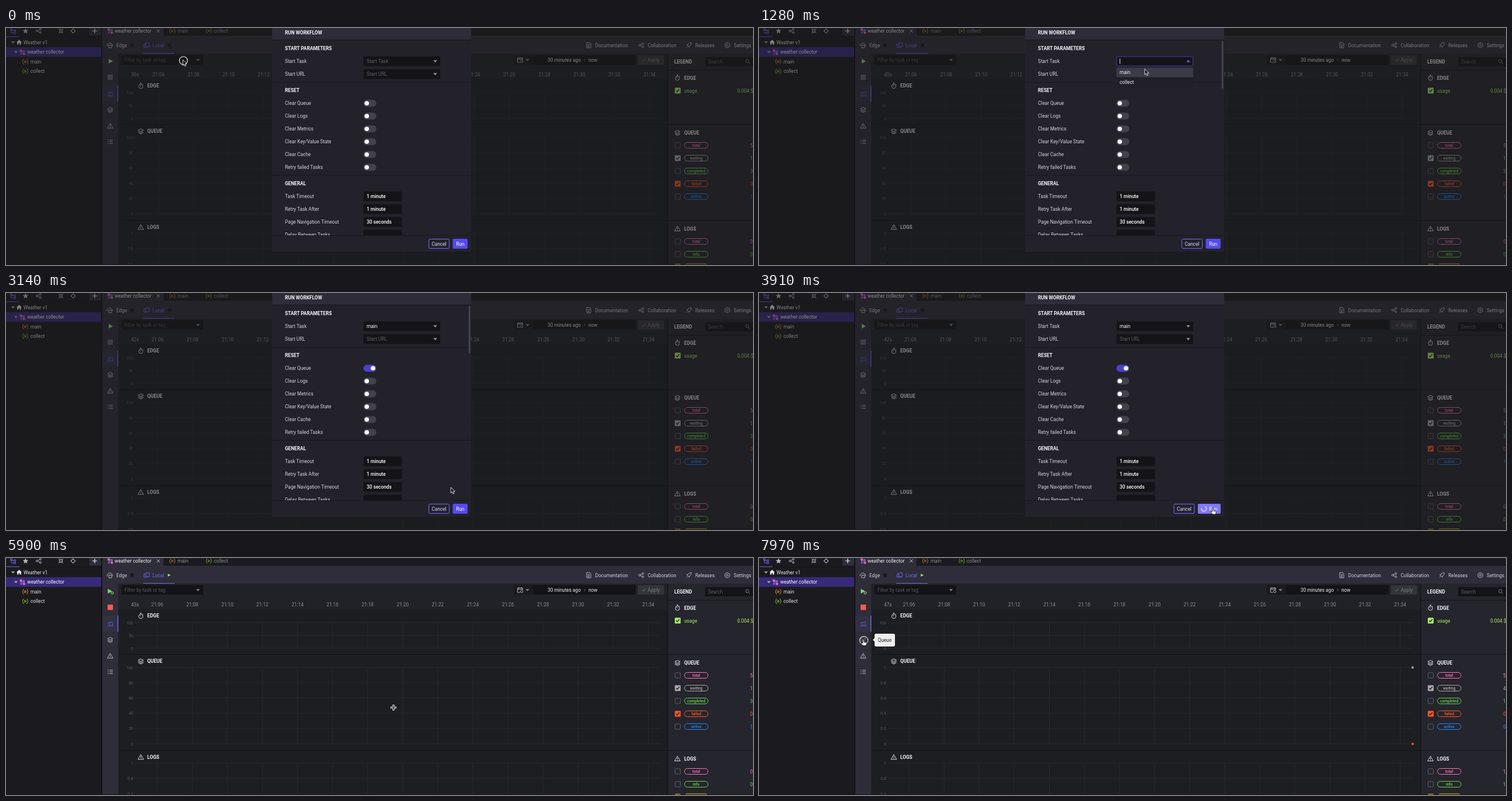
These frames come from a looping animation (1280 px wide and 407 px high, 8000 ms). An HTML page:

```html
<!DOCTYPE html>
<html lang="en">
<head>
<meta charset="utf-8">
<title>Run workflow</title>
<style>
html, body { margin: 0; width: 100%; height: 100%; overflow: hidden; background: #1d1e22; }
svg { display: block; }
#stage { width: 100vw; height: 100vh; }
text { font: 400 8.25px Roboto, "Open Sans", sans-serif; white-space: pre; }
.b { font-weight: 700; }
.m { font-weight: 500; }
.tick { font-size: 7px; }
.pill { font-size: 6.6px; font-weight: 500; }
.spin { animation: spin 1s linear infinite; }
@keyframes spin { from { transform: rotate(-40deg); } to { transform: rotate(320deg); } }
.knob { animation: knob 8s linear infinite; }
@keyframes knob { 0%, 32% { transform: none; } 34%, 100% { transform: translateX(10.6px); } }
.slot { animation: slot 8s linear infinite; }
@keyframes slot { 0%, 32% { fill: #42424d; } 34%, 100% { fill: #4b40cd; } }
.run { animation: run 8s linear infinite; }
@keyframes run { 0%, 42.3% { fill: #554bf0; } 43.5%, 49.5% { fill: #8178fb; } 51.5%, 100% { fill: #554bf0; } }
</style>
</head>
<body>
<svg id="stage" viewBox="0 0 1280 407" preserveAspectRatio="none"></svg>
<script>
const LOOP = 8000;
const css = [];
const pct = ms => (ms / LOOP * 100).toFixed(3) + '%';

// Class that is opaque only inside the given [from, to] spans
function show(name, ...spans) {
  const keys = spans.map(([a, b]) => `${pct(a)}{opacity:1}${pct(b)}{opacity:0}`).join('');
  css.push(`.${name}{animation:${name} ${LOOP}ms step-end infinite}@keyframes ${name}{0%{opacity:0}${keys}}`);
}

// Class that moves through [ms, x, y, easing] points
function track(name, points, ease = 'linear') {
  const key = ([ms, x, y, e]) =>
    `${pct(ms)}{transform:translate(${x}px,${y}px);animation-timing-function:${e || ease}}`;
  const ends = [[0, ...points[0].slice(1, 3)], ...points, [LOOP, ...points[points.length - 1].slice(1, 3)]];
  css.push(`.${name}{animation:${name} ${LOOP}ms linear infinite}@keyframes ${name}{${ends.map(key).join('')}}`);
}

show('modal', [0, 5540]);
show('after', [5540, LOOP]);
show('closed', [0, 890], [1560, LOOP]);
show('open', [890, 1560]);
show('empty', [0, 890]);
show('picked', [1560, LOOP]);
show('bar', [600, 3320], [4500, LOOP]);
show('idle', [0, 3790]);
show('busy', [3790, LOOP]);
show('p0', [0, 6100]);
show('p1', [6100, 7610]);
show('p2', [7610, LOOP]);
show('tip', [7120, LOOP]);
show('guide', [6430, 6880]);
show('ring', [0, 50], [880, 960], [1440, 1560], [2480, 2600], [3440, 3560], [7760, LOOP]);
show('arrow', [0, 2250], [2760, 3380], [3990, 5540]);
show('hand', [2250, 2760], [3380, 3990], [7060, LOOP]);
show('cross', [5540, 7060]);

const turns = [0, 400, 1900, 2900, 4100, 6100, 7610];
const drift = [0, .7, 1.3, 1.7, 2.2, 3.2, 4.2];
track('axis', turns.map((ms, i) => [ms, -drift[i], 0]), 'step-end');
track('secs', turns.map((ms, i) => [ms, 0, -20 * i]), 'step-end');
track('guidex', [[6400, 366, 0], [6550, 318, 0], [6610, 286, 0], [6880, 222, 0]]);
const glide = 'cubic-bezier(.45,0,.4,1)';
track('cursor', [
  [50, 303, 54.5, glide], [830, 662, 56], [900, 662, 56, glide], [1260, 661, 70.5],
  [1750, 661, 70.5, glide], [2380, 621, 128.5], [2600, 621, 128.5, glide],
  [3350, 777, 355], [3500, 777.5, 369.5], [3920, 777.5, 369.5, glide], [4650, 669, 258.5],
  [5840, 669, 258.5, 'cubic-bezier(.4,0,.75,.8)'], [6490, 318, 138], [6550, 292, 135],
  [6610, 281, 135.5], [6880, 215, 139], [7150, 178.5, 140]
]);
document.head.append(Object.assign(document.createElement('style'), { textContent: css.join('\n') }));

const ICONS = {
  layers: 'M-4.5-2 0-4.3 4.5-2 0 .3ZM-4.5 .3 0 2.6 4.5 .3M-4.5 2.3 0 4.6 4.5 2.3',
  warn: 'M0-4.3 4.8 4H-4.8ZM0-1.4V1.3M0 2.2V3',
  timer: 'M-1.5-4.6H1.5M0-4.6V-3M-3.6 .8a3.6 3.6 0 1 0 7.2 0a3.6 3.6 0 1 0-7.2 0M0 .8-1.4-1M3-3l1 1',
  list: 'M-4.5-3H-3M-1.5-3H4.5M-4.5 0H-3M-1.5 0H4.5M-4.5 3H-3M-1.5 3H4.5',
  chart: 'M-4.3 4.5V2M-1.4 4.5V0M1.5 4.5V1M4.3 4.5V-1.5M-4.5-.5-1.5-3 1-1.8 4.5-4.8',
  tree: 'M-4.5-4h3v2.5h-3zM1.5-2h3V.5h-3zM1.5 2.2h3v2.5h-3zM-3-1.5V3.5H1.5M-3-.7H1.5',
  share: 'M-4.4 0a1.5 1.5 0 1 0 3 0a1.5 1.5 0 1 0-3 0M1.4-2.8a1.5 1.5 0 1 0 3 0a1.5 1.5 0 1 0-3 0M1.4 2.8a1.5 1.5 0 1 0 3 0a1.5 1.5 0 1 0-3 0M-1.5-.7 1.5-2.1M-1.5 .7 1.5 2.1',
  shrink: 'M-4-4-1-1M-1-3.5V-1H-3.5M4-4 1-1M1-3.5V-1H3.5M-4 4-1 1M-3.5 1H-1V3.5M4 4 1 1M1 3.5V1H3.5',
  target: 'M-3 0a3 3 0 1 0 6 0a3 3 0 1 0-6 0M0-4.6V-2M0 2V4.6M-4.6 0H-2M2 0H4.6',
  plus: 'M-4 0H4M0-4V4',
  close: 'M-2.6-2.6 2.6 2.6M2.6-2.6-2.6 2.6',
  task: 'M-2.3-4.3-4-3V-1L-5 0-4 1V3L-2.3 4.3M2.3-4.3 4-3V-1L5 0 4 1V3L2.3 4.3M-1.2-2V2L2 0Z',
  edge: 'M-4.5 1.5A2.4 2.4 0 0 1-3-2A3.2 3.2 0 0 1 3-1.6A2 2 0 0 1 4 2M-2 0V4.4H3V0Z',
  local: 'M-4.5-2V3.5H0M-4.5-2H-1.5V-4H4.5V2.5H-1.5V-2M1.5 2.5V4.5',
  doc: 'M-3.5-4.5H1.5L3.5-2.5V4.5H-3.5ZM-1.7-1H1.7M-1.7 1H1.7M-1.7 2.8H1',
  rocket: 'M4.2-4.2C1-4.4-1.3-2.6-2.5 .3L-.3 2.5C2.6 1.3 4.4-1 4.2-4.2ZM-1.8-1.2-4-.6M1.2 1.8 .6 4M-4 4-2 2',
  gear: 'M0-4.6 4-2.3V2.3L0 4.6-4 2.3V-2.3ZM-1.6 0a1.6 1.6 0 1 0 3.2 0a1.6 1.6 0 1 0-3.2 0',
  cal: 'M4.3-.5V-3.5H-4.5V4H0M-4.5-1.2H4.3M-2.3-4.5V-2.6M2.2-4.5V-2.6M.8 2.5a2 2 0 1 0 4 0a2 2 0 1 0-4 0',
  find: 'M-3.5-.6a2.8 2.8 0 1 0 5.6 0a2.8 2.8 0 1 0-5.6 0M1.4 1.5 4 4',
  check: 'M-2.7 0-.8 2 2.9-2.2',
  next: 'M-1-2 1 0-1 2'
};
const at = (x, y) => `transform="translate(${x} ${y})"`;
const icon = (name, x, y, c = '#c4c4c8', w = .9) =>
  `<path d="${ICONS[name]}" ${at(x, y)} fill="none" stroke="${c}" stroke-width="${w}"/>`;
const rect = (x, y, w, h, c, r = 0, more = '') =>
  `<rect x="${x}" y="${y}" width="${w}" height="${h}" rx="${r}" fill="${c}" ${more}/>`;
// y is the pixel row through the middle of the capitals
const text = (x, y, s, c = '#e4e4e6', cls = '', anchor = 'start') =>
  `<text x="${x}" y="${y + 3.4}" fill="${c}" class="${cls}" text-anchor="${anchor}">${s}</text>`;
const tri = (x, y, c, d = 'M-3.2-1.6H3.2L0 2Z') => `<path d="${d}" fill="${c}" ${at(x, y)}/>`;
const up = 'M-3.2 1.6H3.2L0-2Z', play = 'M-3-4 4.2 0-3 4Z';
const group = (cls, ...parts) => `<g class="${cls}">${parts.join('')}</g>`;
const line = (d, c, more = '') => `<path d="${d}" fill="none" stroke="${c}" ${more}/>`;

const PANEL = '#2e2d39', DARK = '#141418', EDGE = '#131317', VIOLET = '#7468fa', ORANGE = '#ff9a3d',
  LIME = '#8fd82f', GREEN = '#a5ee68', RED = '#ff5722', GREY = '#a9a9ad', INK = '#cfcfd4';

const flow = (x, y) => group('', line(`M${x - 2} ${y - 2}L${x + 2} ${y + 2}M${x - 2} ${y + 3}V${y - 2}H${x + 2}`, '#8d7cf0'),
  rect(x - 4.5, y - 4.5, 4, 4, '#ff5d9e', 1), rect(x + 1, y - 3, 3.5, 3.5, '#5b7cff', 1.7),
  rect(x - 4, y + 1.2, 3.5, 3.5, '#6d5cff', 1.7), rect(x + .8, y + 1, 4, 4, '#ff5d9e', 1));

function explorer() {
  return rect(0, 0, 164, 407, '#1b1b1f') +
    icon('tree', 12, 5, VIOLET) +
    `<path d="M0-4.8 1.4-1.5 4.8-1.3 2.2 1 3 4.4 0 2.6-3 4.4-2.2 1-4.8-1.3-1.4-1.5Z" fill="#b9b9be" ${at(33.5, 5)}/>` +
    icon('share', 56, 5) + icon('shrink', 94, 5) + icon('target', 115, 5) +
    rect(143, 0, 20, 13, PANEL) + icon('plus', 152, 5, '#f0f0f2', 1.2) +
    rect(0, 15, 164, 1, EDGE) + rect(1, 14.5, 22, 1, VIOLET) +
    tri(12, 24.5, GREY) + `<path d="M-4.5 0 0-4.3 4.5 0H3.3V4H1V1.3H-1V4H-3.3V0Z" fill="#eee" ${at(22.5, 24.5)}/>` +
    text(30, 24.5, 'Weather v1') +
    rect(0, 33, 164, 16.5, '#382a78') + tri(17, 41.3, GREY) + flow(28, 41.3) + text(36.5, 41, 'weather collector', '#fff') +
    icon('task', 33, 57.8, ORANGE) + text(42, 57.5, 'main') +
    icon('task', 33, 74.3, LIME) + text(42, 74, 'collect') + rect(163, 0, 2, 407, EDGE);
}

function header() {
  const links = [['doc', 998.5, 'Documentation'], ['share', 1088.5, 'Collaboration'], ['rocket', 1170, 'Releases'], ['gear', 1236, 'Settings']];
  return rect(165, 0, 1115, 13, '#1b1b1f') + rect(165, 0, 105, 13, PANEL) + rect(165, 13, 1115, 31, PANEL) +
    flow(178.5, 5) + text(186, 5, 'weather collector', '#f2f2f4') + icon('close', 261, 5) +
    icon('task', 285, 5, '#b6763a') + text(294, 5, 'main', '#8b8b91') +
    icon('task', 347.5, 5, '#73a632') + text(356, 5, 'collect', '#8b8b91') +
    rect(270, 12, 1010, 1, EDGE) +
    icon('edge', 178, 29.5) + text(189, 29.5, 'Edge', INK) + rect(213, 26.5, 6, 6, '#17171b') +
    icon('local', 241, 29.5, VIOLET) + text(251, 29.5, 'Local', VIOLET) + rect(235, 43, 54, 1, VIOLET) +
    group('modal', rect(277, 26.5, 6, 6, '#17171b')) +
    group('after', tri(279.3, 29.5, GREEN, 'M-2-2.6 2.8 0-2 2.6Z')) +
    links.map(([i, x, s]) => icon(i, x, 29.5) + text(x + 11, 29.5, s, INK)).join('');
}

function tools() {
  return rect(165, 44, 27.5, 363, PANEL) + rect(165, 99, 27.5, 27.5, '#313044') + rect(191, 99, 1.3, 27.5, VIOLET) +
    group('modal', tri(179, 57, '#7fe069', play), rect(174, 80, 9, 9, '#64646b')) +
    group('after', tri(177.5, 57, '#7fe069', play), `<circle cx="182" cy="60" r="2" fill="${PANEL}" stroke="${GREEN}"/>`,
      rect(174, 80, 9.3, 9.3, '#ff5a4c')) +
    icon('chart', 178.5, 113.3, VIOLET) + icon('layers', 178.5, 140.5) + icon('warn', 178.5, 168) + icon('list', 178.5, 195.5);
}

function charts() {
  const left = 220, right = 1122;
  const rows = [111, 133, 155, 188, 214.2, 240.4, 266.6, 292.8, 319, 352, 378.5, 405];
  const ticks = (ys, vals) => vals.map((v, i) => text(218, ys[i] - .8, v, '#595a60', 'tick', 'end')).join('');
  const labels = Array.from({ length: 15 }, (_, i) => {
    const x = 261.3 + i * 60.1;
    return line(`M${x} 111V155M${x} 188V319M${x} 352V407`, '#27282d') +
      text(x, 80, '21:' + String(6 + 2 * i).padStart(2, '0'), '#8d8d92', '', 'middle');
  });
  const secs = [38, 40, 42, 42, 43, 45, 47].map((s, i) => text(21, 10 + 20 * i, s + 's', '#8d8d92', '', 'middle'));
  const title = (i, y, s) => icon(i, 231, y + .4, '#ededf0') + text(242, y, s, '#f4f4f6', 'b');
  const queue = rows.slice(3, 9);
  const unit = ticks(queue, ['1', '0.8', '0.6', '0.4', '0.2', '0']);
  return rect(193, 44, 940, 363, '#1d1e22') + rect(193, 44, 940, 44, '#212227') +
    rect(198, 46.5, 140, 16.5, DARK, 2) + text(203, 55, 'Filter by task or tag', '#54545a') + tri(329, 55, '#85858a') +
    rect(870, 46.5, 209, 16.5, DARK, 2) + rect(870, 46.5, 33, 16.5, '#1a1a1f', 2) + icon('cal', 881, 55) + tri(893.5, 55, '#85858a') +
    text(928, 55, '30 minutes ago', '#f0f0f2') + icon('next', 991.5, 55, '#77777c') + text(998, 55, 'now', '#f0f0f2') +
    rect(1082.5, 46.5, 45, 16.5, '#34343d', 2) + icon('check', 1093, 55, '#85858c') + text(1099.5, 55, 'Apply', '#7b7b82') +
    line(rows.map(y => `M${left} ${y}H${right}`).join(''), '#27282d') +
    group('axis', ...labels) +
    `<svg x="200" y="70" width="40" height="20">${group('secs', ...secs)}</svg>` +
    rect(193, 165, 940, 1, EDGE) + rect(193, 330, 940, 1, EDGE) +
    title('timer', 99, 'EDGE') + title('layers', 177, 'QUEUE') + title('warn', 341.5, 'LOGS') +
    ticks(rows, ['100', '50', '0']) + ticks(rows.slice(9), ['1', '0.8', '0.6']) +
    group('p0', ticks(queue, ['100', '80', '60', '40', '20', '0'])) +
    group('p1', unit, line(`M${left} 188H${right}`, GREY, 'stroke-width="1.2"'), line(`M${left} 319.3H${right}`, RED, 'stroke-width="1.3"')) +
    group('p2', unit, `<circle cx="1120" cy="188" r="2" fill="${GREY}"/><circle cx="1120" cy="319.3" r="2" fill="${RED}"/>`) +
    group('guide', group('guidex', line('M0 111V155', '#77787d', 'stroke-dasharray="3 2"')));
}

function legend() {
  const rows = [
    ['total', 201.5, '#ff70b6', 0, '515'], ['waiting', 223.5, GREY, 1, '114'], ['completed', 245.5, '#6bd546', 0, '301'],
    ['failed', 267.5, RED, 1, '000'], ['active', 289.5, '#2389ff', 0, '100'],
    ['total', 366.5, '#ff70b6', 0, '011'], ['info', 388.5, '#6bd546', 0, '011'], ['warn', 410, '#f2c01c', 1, '000']
  ];
  const box = (y, c, on) => on
    ? rect(1146, y - 5, 10, 10, c, 1) + icon('check', 1151, y, '#202027', 1.4)
    : rect(1146.5, y - 4.5, 9, 9, 'none', 1, 'stroke="#5d5d66"');
  const title = (i, y, s) => icon(i, 1150.5, y, '#ededf0') + text(1162, y, s, '#f4f4f6', 'b');
  const row = ([s, y, c, on]) => box(y, c, on) + rect(1162.5, y - 5, 40.5, 10, 'none', 5, `stroke="${c}"`) +
    text(1182.7, y - .9, s, c, 'pill', 'middle');
  const phase = n => group('p' + n, ...rows.map(([, y, c, , v]) => text(1275, y, v[n], c)));
  return rect(1133, 44, 147, 363, '#25252d') + rect(1133, 44, 1.3, 363, EDGE) +
    text(1145, 57.5, 'LEGEND', '#f4f4f6', 'b') + rect(1198, 50, 90, 16, DARK, 2) + text(1203, 57.5, 'Search', '#5c5c63') +
    icon('find', 1271, 57.5, '#8a8a90') +
    [72, 165, 330].map(y => rect(1133, y, 147, 1, EDGE)).join('') +
    title('timer', 85.5, 'EDGE') + box(107.5, GREEN, 1) + text(1162, 107.5, 'usage', GREEN) + text(1253, 107.5, '0.004 $', GREEN) +
    title('layers', 180, 'QUEUE') + title('warn', 344.5, 'LOGS') + rows.map(row).join('') + [0, 1, 2].map(phase).join('');
}

function dialog() {
  const LABEL = '#d3d3d8', X = 478;
  const head = (y, s) => text(X, y, s, '#f4f4f6', 'b');
  const toggles = ['Clear Queue', 'Clear Logs', 'Clear Metrics', 'Clear Key/Value State', 'Clear Cache', 'Retry failed Tasks'];
  const toggle = (s, i) => {
    const y = 129 + 22 * i;
    return text(X, y, s, LABEL) + rect(612.5, y - 5.8, 22, 12, '#42424d', 6, i ? '' : 'class="slot"') +
      `<circle cx="618.2" cy="${y + .2}" r="3.8" fill="#fff" class="${i ? '' : 'knob'}"/>`;
  };
  const fields = [['Task Timeout', '1 minute'], ['Retry Task After', '1 minute'], ['Page Navigation Timeout', '30 seconds'], ['Delay Between Tasks', '']];
  const field = ([s, v], i) => {
    const y = 289 + 22 * i;
    return text(X, y, s, LABEL) + rect(612.5, y - 8.5, 66, 17, DARK, 2) + text(618, y, v, '#fff', 'm');
  };
  const cancel = x => rect(x - 17.5, 362.5, 35, 16, 'none', 2, `stroke="${VIOLET}"`) + text(x, 370.5, 'Cancel', '#d9d6ff', '', 'middle');
  const runText = text(778.3, 370.5, 'Run', '#fff', '', 'middle');
  return rect(456, 0, 341, 384, '#23222b') + rect(456, 0, 341, 20, '#2d2c38') + head(7.5, 'RUN WORKFLOW') +
    [20, 93, 252.5].map(y => rect(456, y, 341, 1, '#17171c')).join('') +
    head(35, 'START PARAMETERS') + text(X, 57, 'Start Task', LABEL) + text(X, 79, 'Start URL', LABEL) +
    rect(612.5, 48.7, 131.5, 16.8, DARK, 2) + rect(612.5, 70.7, 131.5, 16.8, DARK, 2) +
    text(618, 79, 'Start URL', '#5f5f67') + tri(735.5, 79, '#a3a3a8') +
    head(107, 'RESET') + toggles.map(toggle).join('') + head(267, 'GENERAL') + fields.map(field).join('') +
    group('closed', tri(735.5, 57, '#a3a3a8')) + group('empty', text(618, 57, 'Start Task', '#5f5f67')) +
    group('picked', text(618, 57, 'main', '#fff')) +
    group('open', rect(612.8, 49.1, 130.8, 16, 'none', 2, 'stroke="#5348dc" stroke-width=".8"'), rect(618, 52.5, .9, 9, '#fff'), tri(735.5, 57, VIOLET, up),
      rect(612.5, 67, 131.5, 37, '#212029', 2), rect(612.5, 68, 131.5, 16.5, '#3b3b46'),
      text(618, 76, 'main', '#f0f0f2'), text(618, 92.5, 'collect', '#f0f0f2')) +
    group('bar', rect(792.8, 22, 2.8, 82, '#464552', 1.4)) +
    rect(456, 356, 341, 28, '#23222b') + rect(456, 356, 341, 1, '#17171c') +
    group('idle', cancel(742), rect(765.5, 362, 25.5, 17, '#554bf0', 2, 'class="run"'), runText) +
    group('busy', cancel(728.5), rect(752, 362, 39, 17, '#554bf0', 2, 'class="run"'), runText,
      `<g ${at(762.5, 370.5)}><path class="spin" d="M0-4.3A4.3 4.3 0 1 0 4.3 0" fill="none" stroke="#fff" stroke-width="1.1"/></g>`);
}

function pointer() {
  const hand = 'M-.9 0Q.3-1.3 1.3 0V3.6L5 4.5Q6.2 5 5.8 7L5 10.5H-.3L-3.3 6.8Q-3.4 5.2-1.8 5.8L-.9 6.5Z';
  return group('cursor',
    group('ring', '<circle cx="1" cy="1.5" r="7" fill="#000" fill-opacity=".3" stroke="#fff" stroke-width="1.1"/>'),
    group('arrow', '<path d="M0 0V9.6L2.2 7.6 3.7 11 5.5 10.2 4 6.9H7Z" fill="#000" stroke="#fff" stroke-width=".9"/>'),
    group('hand', `<path d="${hand}" fill="#fff" stroke="#000" stroke-width=".8"/>`, line('M1.3 5.8V3.6M2.6 6V4M4 6.2V4.4', '#000', 'stroke-width=".5"')),
    group('cross', line('M-5 0H5M0-5V5', '#fff', 'stroke-width="3.2"'), line('M-4.2 0H4.2M0-4.2V4.2', '#000', 'stroke-width="1.2"')));
}

const tip = group('tip', '<path d="M195 140.5l4-4v8z" fill="#efeff0"/>', rect(198, 130, 35, 22, '#efeff0', 3),
  text(203.5, 140.7, 'Queue', '#25252a'));

document.getElementById('stage').innerHTML =
  explorer() + header() + tools() + charts() + legend() + rect(0, 406, 1280, 1, EDGE) + tip +
  group('modal', rect(0, 0, 1280, 407, '#1a1a1d', 0, 'fill-opacity=".5"'), dialog()) + pointer();
</script>
</body>
</html>
```
